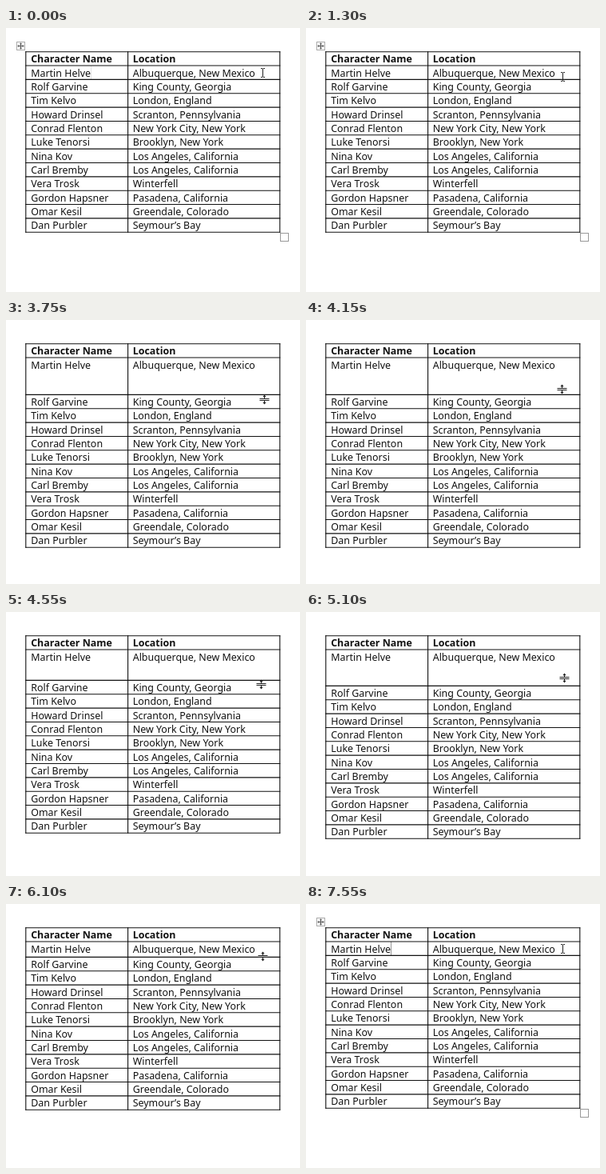
An HTML page that plays this animation: 368 px wide and 330 px high, repeating every 7.6 s.

```html
<!DOCTYPE html>
<html lang="en">
<head>
<meta charset="utf-8">
<title>Resizing a table row</title>
<style>
  html, body { margin: 0; width: 100%; height: 100%; overflow: hidden; background: #fff; }
  svg { display: block; width: 368px; height: 330px; }
  text { font: 12.45px "Noto Sans", "Open Sans", sans-serif; fill: #111; }
  .head { font-weight: 700; }
  .rule { stroke: #111; stroke-width: 1.1; stroke-linecap: square; }
</style>
</head>
<body>
<svg viewBox="0 0 368 330">
  <g id="top"></g>
  <g id="body"></g>
  <g id="sides"></g>

  <g id="handles">
    <rect x="13.5" y="17.5" width="10" height="10" fill="#fff" stroke="#aaa"/>
    <path d="M18.5 19v7M15 22.5h7" stroke="#555"/>
    <path d="M18.5 18.3l1.7 2h-3.4zM18.5 26.7l1.7-2h-3.4zM14.3 22.5l2-1.7v3.4zM22.7 22.5l-2-1.7v3.4z" fill="#555"/>
    <rect x="343.5" y="256.5" width="10" height="10" fill="#fff" stroke="#999"/>
  </g>

  <path id="guide" d="M0 64.5H368" stroke="#555" stroke-dasharray="2 2"/>
  <path id="caret" d="M106.5 47V64" stroke="#111"/>
  <path id="beam" d="M-2.5 -5.5H-1L0 -5L1 -5.5H2.5M0 -5V5M-2.5 5.5H-1L0 5L1 5.5H2.5" fill="none" stroke="#222"/>
  <g id="sizer">
    <path d="M-6 -1H6M-6 1H6M0 -5V-1M0 1V5" stroke="#222"/>
    <path d="M0 -6L2.2 -3.3H-2.2zM0 6L2.2 3.3H-2.2z" fill="#222"/>
  </g>
</svg>

<script>
const LOOP = 7600, STEP = 50;
const LEFT = 24.8, MID = 152.6, RIGHT = 342.8, TOP = 29.7, PITCH = 17.35;
const PRESS = 3150, DRAG = 3450, RELEASE = 6300;

const rows = [
  ["Character Name", "Location"],
  ["Martin Helve", "Albuquerque, New Mexico"],
  ["Rolf Garvine", "King County, Georgia"],
  ["Tim Kelvo", "London, England"],
  ["Howard Drinsel", "Scranton, Pennsylvania"],
  ["Conrad Flenton", "New York City, New York"],
  ["Luke Tenorsi", "Brooklyn, New York"],
  ["Nina Kov", "Los Angeles, California"],
  ["Carl Bremby", "Los Angeles, California"],
  ["Vera Trosk", "Winterfell"],
  ["Gordon Hapsner", "Pasadena, California"],
  ["Omar Kesil", "Greendale, Colorado"],
  ["Dan Purbler", "Seymour’s Bay"]
];

// Turning points of the drag: [time, distance]
const turns = [[3400, 0], [3920, 46], [4300, 10], [4890, 53], [5180, 10], [5680, 46], [5870, 8], [6150, 0]];

const $ = id => document.getElementById(id);
const lineY = i => TOP + PITCH * i;
const clamp = p => Math.min(1, Math.max(0, p));
const ramp = (t, from, to) => clamp((t - from) / (to - from));
const smooth = p => (1 - Math.cos(Math.PI * p)) / 2;
const wave = (t, period) => Math.sin(2 * Math.PI * t / period);

function add(parent, tag, attrs, content = "") {
  const el = document.createElementNS("http://www.w3.org/2000/svg", tag);
  for (const key in attrs) el.setAttribute(key, attrs[key]);
  el.textContent = content;
  return parent.appendChild(el);
}

function rule(parent, x1, y1, x2, y2) {
  return add(parent, "line", { x1, y1, x2, y2, class: "rule" });
}

// Sum of the eased moves between turning points
function pull(t) {
  return turns.slice(1).reduce((sum, [end, to], i) => {
    const [begin, from] = turns[i];
    return sum + (to - from) * smooth(ramp(t, begin, end));
  }, 0);
}

// The fade at the end of the loop runs on into its beginning
function blink(t) {
  const phase = t < 300 ? t + LOOP : t;
  return clamp(.5 + 1.1 * wave(phase - 650, 1060));
}

rows.forEach(([name, place], i) => {
  const group = i < 2 ? $("top") : $("body");
  const y = Math.round(lineY(i) + 13.5), cls = i ? "" : "head";
  rule(group, LEFT, lineY(i), RIGHT, lineY(i));
  add(group, "text", { x: 31.2, y, class: cls }, name);
  add(group, "text", { x: 158.7, y, class: cls }, place);
});
const bottom = lineY(rows.length);
rule($("body"), LEFT, bottom, RIGHT, bottom);
const sides = [LEFT, MID, RIGHT].map(x => rule($("sides"), x, TOP, x, bottom));

function show(id, on) {
  $(id).style.visibility = on ? "visible" : "hidden";
}

function move(id, x, y) {
  $(id).setAttribute("transform", `translate(${x} ${y})`);
}

function draw(now) {
  const t = Math.floor((now % LOOP) / STEP) * STEP;
  const dragging = t >= DRAG && t < RELEASE;
  // The row border trails the pointer by one step
  const grow = Math.round(pull(t - STEP));
  move("body", 0, grow);
  sides.forEach(line => line.setAttribute("y2", bottom + grow));

  const sizing = t >= 1700 && t < 6400;
  show("sizer", sizing);
  show("beam", !sizing);
  show("handles", !dragging);
  show("guide", t >= PRESS && t < DRAG);
  show("caret", t < DRAG || t >= 6900);
  $("caret").style.opacity = blink(t);

  const sway = dragging ? 2 * wave(t - 3400, 1350) : 0;
  move("sizer", Math.round(321 + sway) + .5, Math.round(64 + pull(t)) + .5);
  move("beam", 321.5, 56 + 5 * (ramp(t, 850, 1050) - ramp(t, 6350, 6550)));
}

const start = performance.now();
function tick() {
  draw(performance.now() - start);
  requestAnimationFrame(tick);
}
tick();
</script>
</body>
</html>
```
